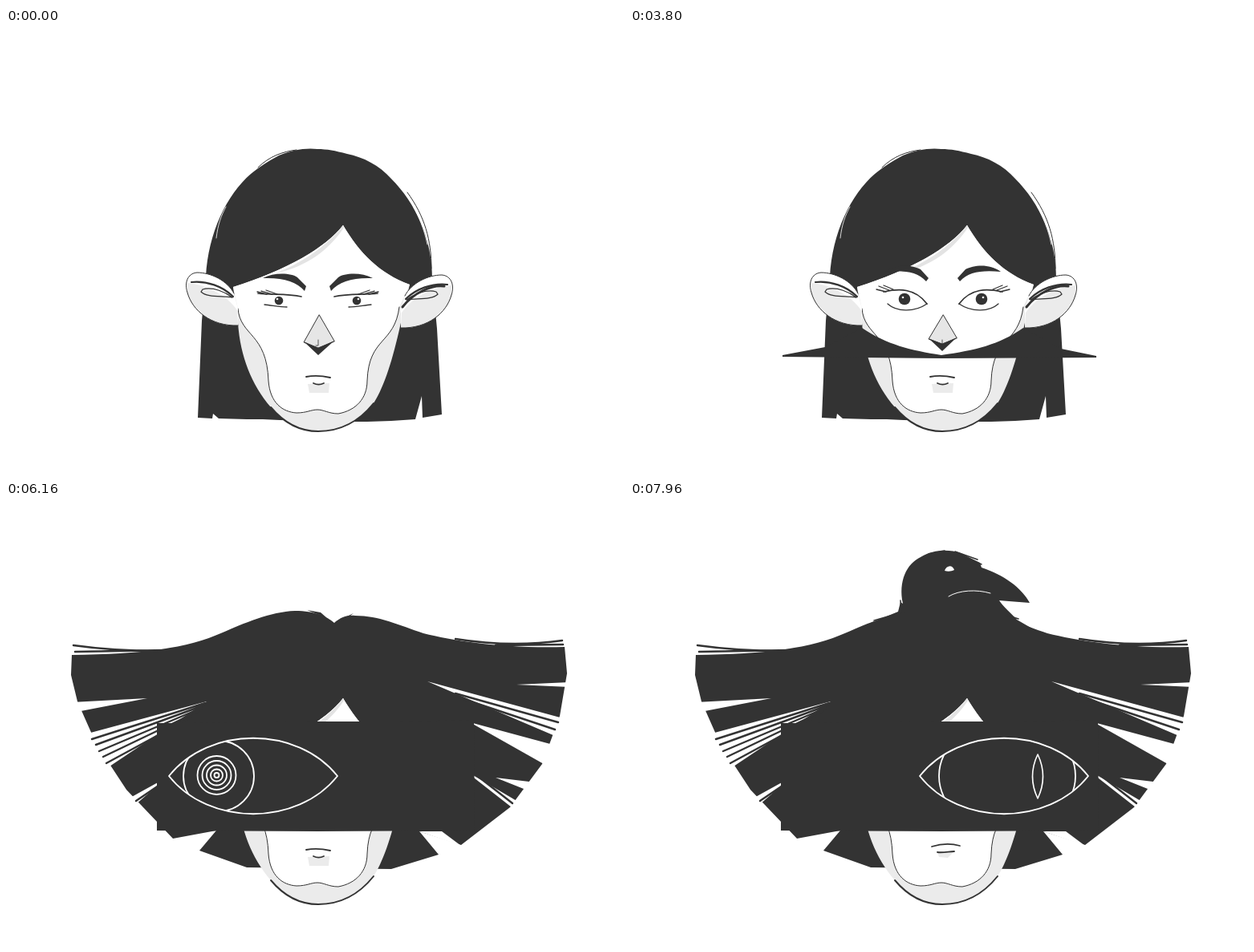
Animation of 770 by 555 pixels, one loop 8000 ms. Source, as an HTML page with a canvas:

```html
<!DOCTYPE html>
<html lang="en">
<head>
<meta charset="utf-8">
<title>Portrait</title>
<style>
  html, body { margin: 0; width: 100%; height: 100%; overflow: hidden; background: #fff; }
  canvas { display: block; }
</style>
</head>
<body>
<canvas id="stage" width="770" height="555"></canvas>
<script>
const ctx = document.getElementById('stage').getContext('2d');
const INK = '#333', GREY = '#ebebeb', WHITE = '#fff';
const LOOP = 8000, STEP = 40;

// Blend two numbers, or two paths that share the same commands.
function mix(a, b, k) {
  if (typeof a === 'number') return a + (b - a) * k;
  const ends = b.match(/-?[\d.]+/g);
  let i = 0;
  return a.replace(/-?[\d.]+/g, v => +v + (ends[i++] - v) * k);
}

// Keys are [time, value] pairs, eased from one to the next.
function track(t, ...keys) {
  const next = keys.findIndex(key => key[0] > t);
  if (next === 0) return keys[0][1];
  if (next < 0) return keys[keys.length - 1][1];
  const [t0, a] = keys[next - 1], [t1, b] = keys[next];
  const k = (t - t0) / (t1 - t0);
  return mix(a, b, k * k * (3 - 2 * k));
}

function fill(d, color = INK) {
  ctx.fillStyle = color;
  ctx.fill(new Path2D(d));
}

function line(d, width = 1, color = INK) {
  ctx.strokeStyle = color;
  ctx.lineWidth = width;
  ctx.stroke(new Path2D(d));
}

function disc(x, y, r, color) {
  ctx.fillStyle = color;
  ctx.beginPath();
  ctx.arc(x, y, r, 0, 7);
  ctx.fill();
}

function ring(x, y, rx, ry) {
  ctx.strokeStyle = WHITE;
  ctx.lineWidth = 1.8;
  ctx.beginPath();
  ctx.ellipse(x, y, rx, ry, 0, 0, 7);
  ctx.stroke();
}

function withState(draw) {
  ctx.save();
  draw();
  ctx.restore();
}

// Hair outlines: crown, left side, hem, right side, crown.
const LONG = `M388 151C375 149 355 152 340 159C325 167 316 173 305 182C275 208 252 255 249 310
  L244 365L239 486L257 487L258 481L265 487L300 488L320 488L341 489
  L430 491L450 491L480 490L510 488L518 459L519 486L543 482L537 375L531 312
  C531 262 510 218 480 188C465 171 445 161 425 157C410 153 400 151 388 151Z`;
const FLING = `M411 151C400 140 370 126 330 134C345 136 285 152 248 208C238 230 231 250 226 277
  L215 405L208 425L225 431L228 430L240 436L250 441L265 447L318 460
  L455 464L480 459L500 455L546 439L544 420L551 434L582 420L572 408L562 274
  C557 240 542 207 520 181C505 165 490 153 470 148C450 139 425 140 411 151Z`;
const BOB = `M409 152C400 144 385 137 360 137C335 137 312 147 290 163C255 190 235 230 228 277
  L228 411L232 432L236 436L238 437L245 439L255 442L270 447L318 458
  L455 463L490 455L505 451L520 446L535 441L545 438L550 432L550 411L551 274
  C545 232 520 185 480 158C462 148 448 144 435 143C425 142 417 145 409 152Z`;
const WINGS = `M409 152C400 144 385 137 360 137C330 138 295 153 270 164C225 184 170 191 82 192
  L81 217L89 250L112 302L150 360L208 421L262 411L241 436L300 457
  L480 459L539 441L515 412L567 429L628 382L668 328L690 268L699 215L696 182
  C620 184 560 175 520 165C490 155 465 143 435 143C425 142 417 145 409 152Z`;
const DROP = mix(BOB, LONG, 0.6);

// Gaps between feathers: apex, then two points on the rim.
const GAPS = [
  [176, 246, 82, 251, 88, 263], [250, 250, 98, 291, 126, 333], [200, 345, 153, 371, 161, 379],
  [636, 229, 702, 226, 702, 232], [525, 225, 694, 271, 684, 293], [578, 276, 678, 303, 670, 328],
  [610, 345, 660, 351, 650, 361], [570, 335, 638, 375, 630, 382], [515, 412, 543, 412, 567, 430]
];
const STRANDS = `M190 187C150 187 120 185 84 180M200 186L86 188
  M248 252L107 297M246 255L112 304M244 258L116 312M240 262L121 319M232 269L125 327
  M190 355L162 374M560 240L688 276M570 247L684 285M590 345L631 377
  M560 172C610 180 650 180 693 174M610 180L694 179`;

const INNER_CHEEKS = `C292 385 325 380 327 440C329 468 345 479 362 480C375 480 380 476 388 476
  C396 476 402 481 414 481C436 477 450 462 450 440C452 385 484 395 490 348`;
const CHIN = 'C350 497 370 503 389 503C420 503 442 488 458 468';
const FACE = `M420 246C398 274 350 302 283 323L289 368C292 410 306 445 330 473${CHIN}
  C472 446 482 412 491 372L503 320C465 306 440 280 420 246Z`;

const BAND_FLAT = `M190 409L243 409L289 409C320 409 350 409 388 409C430 409 460 409 490 409
  L537 409L581 408L581 411L388 412L190 410Z`;
const BAND_RISING = `M190 408L243 398L289 374C320 395 350 402 388 408C430 402 460 395 490 374
  L537 400L581 409L581 411L388 412L190 410Z`;
const BAND_WIDE = `M175 272L230 271L289 270C320 270 350 270 388 270C430 270 460 270 490 270
  L537 269L596 268L596 412L388 413L175 412Z`;
const BAND = `M188 277L230 277L289 276C320 276 350 276 388 275C430 275 460 275 490 275
  L537 274L583 273L584 411L388 412L188 411Z`;

function drawHair(t) {
  const open = track(t, [5600, 0], [5920, 1]);
  fill(track(t, [3800, LONG], [4240, FLING], [4440, FLING], [4680, DROP], [4960, BOB],
    [5600, BOB], [5920, WINGS]));
  if (t <= 3800) {
    line('M262 262C264 245 268 234 274 223M525 270C521 250 514 235 508 224', 0.8, WHITE);
    line('M314 174C328 160 345 154 362 152M500 205C522 235 530 265 530 300');
  }
  if (t >= 4240 && t < 4560) {
    fill('M505 163L542 194L518 183ZM256 194L240 218L260 206ZM390 142L403 135L411 152ZM360 132L330 134L350 138Z');
  }
  if (t >= 4960) fill('M410 151L433 140L424 147ZM375 136L392 139L400 146Z');
  for (const [x, y, ax, ay, bx, by] of open ? GAPS : []) {
    const mx = (ax + bx) / 2, my = (ay + by) / 2;
    fill(`M${x} ${y}L${mix(mx, ax, open)} ${mix(my, ay, open)}L${mix(mx, bx, open)} ${mix(my, by, open)}Z`, WHITE);
  }
  if (open > 0.8) line(STRANDS, 2.4);
}

function drawFlap(t) {
  const lift = track(t, [6240, 0], [6360, 1], [6560, 0]);
  if (!lift) return drawHair(t);
  for (const side of [-1, 1]) withState(() => {
    ctx.beginPath();
    ctx.rect(side < 0 ? 0 : 409, 0, side < 0 ? 409 : 361, 555);
    ctx.clip();
    ctx.translate(409, 152);
    ctx.transform(side < 0 ? 1 + 0.15 * lift : 1, -side * 0.2 * lift, 0, 1, 0, 0);
    ctx.translate(-409, -152);
    drawHair(t);
  });
}

function drawBird(t) {
  if (t < 7080) return;
  withState(() => {
    ctx.translate(track(t, [7400, 0], [7640, 14], [7840, 14], [7960, 0]),
      track(t, [7080, 105], [7360, -17], [7560, 3], [7720, 0]));
    fill(`M300 152L334 138L337 126L340 128C334 100 345 78 362 70C378 60 398 60 412 65
      L436 77L438 83C465 92 488 108 498 127C485 126 472 125 460 124C465 132 475 140 482 148L520 170L300 170Z`);
    line('M372 66L392 62M405 63L433 73M408 66L438 79M337 124L338 136M304 149L342 138M462 130L470 138M468 142L484 147', 1.5);
    if (t >= 7400) {
      fill('M392 87C394 80 402 79 404 86C400 88 396 88 392 87Z', WHITE);
      line('M397 119C410 111 432 110 449 115', 1, WHITE);
    }
  });
}

function drawEar(x, y, mirror) {
  withState(() => {
    ctx.translate(x, y);
    ctx.scale(mirror, 1);
    const shape = 'M284 331C276 315 255 305 238 305C226 306 222 318 226 330C232 352 255 372 289 371L289 350Z';
    fill(shape, WHITE);
    fill('M226 318C250 320 275 333 288 352L289 371C255 372 232 352 226 330Z', GREY);
    line('M284 331C276 315 255 305 238 305C226 306 222 318 226 330C232 352 255 372 289 371');
    line('M231 317C250 315 270 322 283 335', 2.2);
    line('M245 326C258 322 274 330 282 336C268 334 250 336 243 329Z', 1.3);
    if (mirror < 0) line('M287 345C273 327 251 317 235 319', 3);
  });
}

function drawEye(open, blink) {
  fill(mix('M320 312C335 304 356 306 363 311L374 322L372 328C362 316 345 311 320 312Z',
    'M318 304C333 293 352 296 362 301L372 312L369 316C358 304 342 302 318 304Z', open));
  const drop = blink * 8;
  withState(() => {
    ctx.translate(0, drop);
    line(mix('M314 331C330 333 350 331 368 335', 'M316 329C335 325 355 324 370 344', open), 1.7);
    line(mix('M313 329L325 332M318 328L332 332M324 327L338 332',
      'M307 326L319 329M310 322L323 327M316 321L328 326', open), 1.3);
  });
  line(mix('M322 345C332 346 342 348 350 348', 'M321 344C332 354 354 355 370 344', open), 1.3);
  if (blink < 1) {
    const x = 340 + 2 * open, y = 340 - 2 * open + drop / 2;
    disc(x, y, (5.3 + 2 * open) * (1 - blink / 2), INK);
    disc(x - 2, y - 2, 1.3, WHITE);
  }
}

function drawFace(t) {
  fill(FACE, GREY);
  fill(`M420 246C398 274 350 302 283 323L289 350${INNER_CHEEKS}L503 320C465 306 440 280 420 246Z`, WHITE);
  fill('M420 246C398 274 365 295 335 306C375 298 402 277 421 249Z', '#e3e3e3');
  line('M289 350' + INNER_CHEEKS);
  line('M330 473' + CHIN, 2);
  drawEar(0, 0, 1);
  drawEar(781, 3, -1);

  const open = track(t, [2880, 0], [3080, 1]);
  const inBlink = start => t >= start && t < start + 80;
  const blink = inBlink(1600) ? (t < 1640 ? 0.5 : 1)
    : t >= 840 && t < 960 ? (t < 880 ? 0.5 : 1) : 0;
  drawEye(open, blink);
  withState(() => {
    ctx.translate(777 + 3 * open, 0);
    ctx.scale(-1, 1);
    drawEye(open, blink);
  });

  const nose = mix('M390 358L371 392L389 399L409 391Z', 'M390 358L372 388L389 394L407 387Z', open);
  fill(nose, '#e6e6e6');
  line(nose);
  fill(mix('M371 391L389 399L409 390L389 408Z', 'M372 387L389 394L407 386L389 403Z', open));
  line('M389 389L389 396L386 396', 0.8);

  const smirk = track(t, [6280, 0], [6480, 1]);
  fill(mix('M376 444L403 443L402 455L378 455Z', 'M383 438L403 438L396 445L385 444Z', smirk), GREY);
  line(mix('M374 435C385 433 395 434 404 436', 'M376 431C386 428 400 427 411 430', smirk), 1.8);
  line(mix('M383 443C387 445 392 445 396 443', 'M383 438C390 439 398 437 404 437', smirk), 1.8);
}

function drawBand(t) {
  if (t < 3280) return;
  if (t < 3720) {
    const left = track(t, [3280, 640], [3640, 190]), right = track(t, [3280, 675], [3680, 581]);
    return fill(`M${left} 410L${right} 407L${right} 411Z`);
  }
  fill(track(t, [3720, BAND_FLAT], [3800, BAND_RISING], [3960, BAND_WIDE], [4080, BAND]));
}

function drawBandEye(t) {
  if (t < 4120) return;
  const x = track(t, [5400, 388], [5520, 308], [7080, 308], [7280, 466]);
  const irisX = track(t, [5400, 388], [5520, 265], [7080, 265], [7280, 470]);
  const size = track(t, [4200, 0], [4360, 37], [5400, 37], [5520, 44]);
  const rx = size + track(t, [7080, 0], [7320, 41]);
  const ry = size + track(t, [7080, 0], [7320, 26]);
  const lens = `M${x - 105} 343C${x - 55} 280 ${x + 55} 280 ${x + 105} 343C${x + 55} 406 ${x - 55} 406 ${x - 105} 343Z`;

  withState(() => {
    const drawn = track(t, [4120, 0], [4360, 1]);
    if (drawn < 1) ctx.setLineDash([500 * drawn, 500]);
    line(lens, 1.8, WHITE);
  });
  if (t >= 4320 && t < 4520) line('M420 300C432 305 438 310 440 317M351 387C342 382 338 377 336 371', 2, WHITE);

  withState(() => {
    ctx.clip(new Path2D(lens));
    if (size) ring(irisX, 343, rx, ry);
  });

  const ringScale = track(t, [5440, 0], [5520, 1], [7080, 1], [7200, 0]);
  if (ringScale) {
    for (const rest of [24, 18, 12.5, 7.5, 3]) {
      const r = ringScale * Math.max(rest, 24 - Math.max(0, t - 5520) * 0.075);
      ring(irisX - 2.5, 342, r, r);
    }
  }
  const slit = track(t, [7240, 0], [7440, 1]);
  if (slit) {
    const sx = x + 42, w = 13 * slit, h = 27.5 * slit;
    line(`M${sx} ${343.5 - h}Q${sx + w} 343.5 ${sx} ${343.5 + h}Q${sx - w} 343.5 ${sx} ${343.5 - h}Z`, 1.6, WHITE);
  }
}

function render(now) {
  const t = Math.floor((now % LOOP) / STEP) * STEP;
  ctx.fillStyle = WHITE;
  ctx.fillRect(0, 0, 770, 555);
  drawFlap(t);
  drawBird(t);
  drawFace(t);
  drawBand(t);
  drawBandEye(t);
}

ctx.lineCap = ctx.lineJoin = 'round';
const start = performance.now();
function tick() {
  render(performance.now() - start);
  requestAnimationFrame(tick);
}
tick();
</script>
</body>
</html>
```
